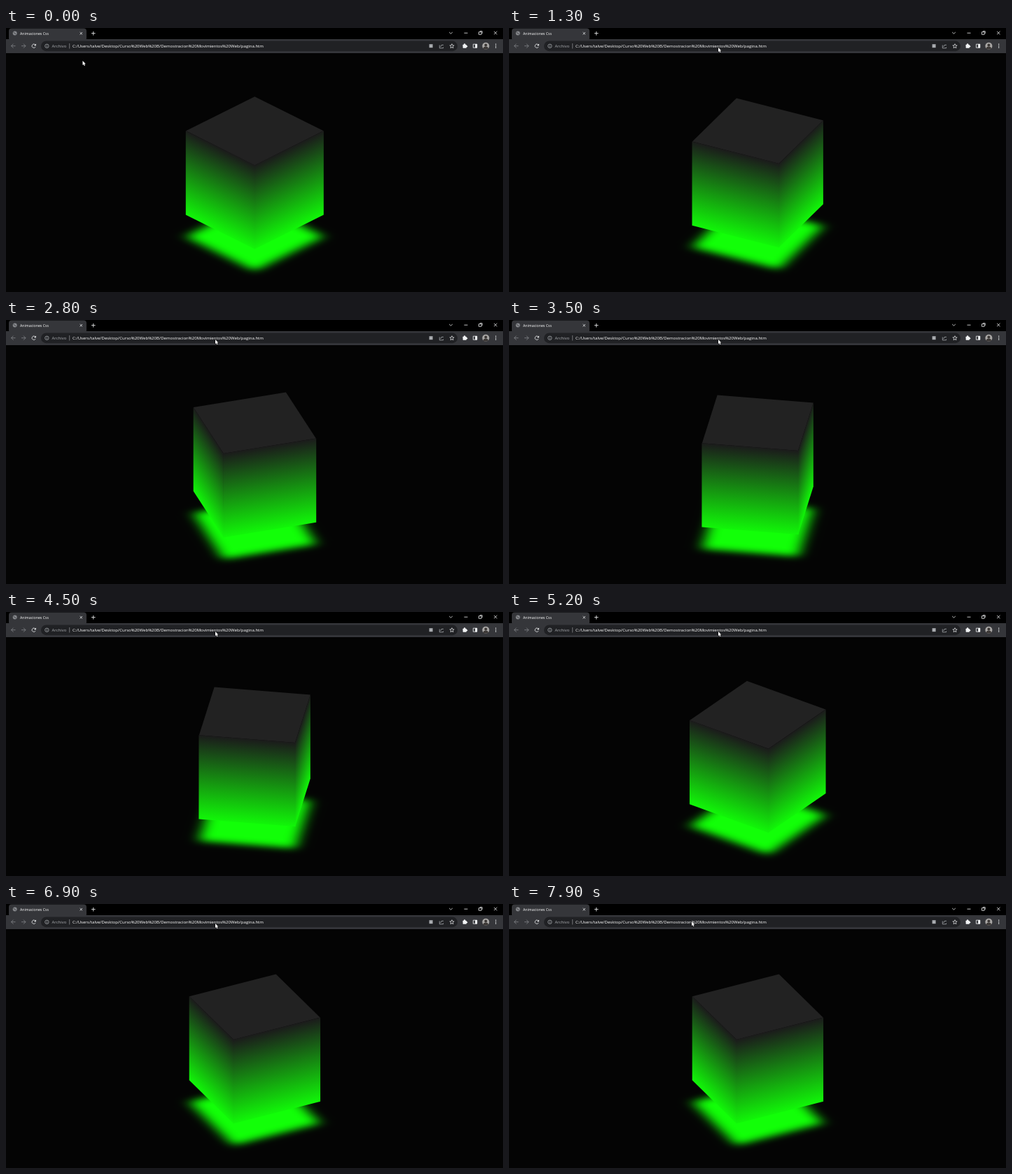
Recreate the animation shown at these times as an HTML page with a canvas. Size 710x378 px, loop 8000 ms.

```html
<!DOCTYPE html>
<html lang="es">
<head>
<meta charset="utf-8">
<title>Animaciones Css</title>
<style>
html, body { margin: 0; width: 100%; height: 100%; overflow: hidden; background: #040404; }
canvas { display: block; }
</style>
</head>
<body>
<canvas id="stage" width="710" height="378"></canvas>
<script>
const ctx = document.getElementById('stage').getContext('2d');
const LOOP = 8000, STEP = 100, DELAY = 100, PERIOD = 4000;
const GREEN = '#12ff08', BAR = '#35363a', DARK = '#202124';
const ICON = '#f1f3f4', SOFT = '#a8abaf', DIM = '#85878b';
const CX = 355.3, TOP_Y = 147.3, RADIUS = 98.2, HEIGHT = 120.3, FLOOR_Y = 298.7;
const SIDE = RADIUS * Math.SQRT2;
const FONT = '"Open Sans", "Noto Sans", sans-serif';

const ease = (t, from, to) => {
  const p = Math.min(1, Math.max(0, (t - from) / (to - from)));
  return p * p * (3 - 2 * p);
};

// Shapes around an origin: place(x, y, draw) moves it.
function place(x, y, paint) {
  ctx.save();
  ctx.translate(x, y);
  paint();
  ctx.restore();
}

function path(points, close) {
  ctx.beginPath();
  points.forEach(([x, y]) => ctx.lineTo(x, y));
  if (close) ctx.closePath();
}

function stroke(color, width = .8) {
  ctx.strokeStyle = color;
  ctx.lineWidth = width;
  ctx.stroke();
}

function fill(color) {
  ctx.fillStyle = color;
  ctx.fill();
}

function line(color, ...points) {
  path(points);
  stroke(color);
}

function box(x, y, w, h, r = 0) {
  ctx.beginPath();
  ctx.roundRect(x, y, w, h, r);
}

function arc(x, y, r, from = 0, to = 2 * Math.PI) {
  ctx.beginPath();
  ctx.arc(x, y, r, from, to);
}

function text(str, x, y, size, color) {
  ctx.font = `${size}px ${FONT}`;
  ctx.fillStyle = color;
  ctx.fillText(str, x, y);
}

function cross(r) {
  line(ICON, [-r, -r], [r, r]);
  line(ICON, [-r, r], [r, -r]);
}

function arrow(dir) {
  line(DIM, [-3 * dir, 0], [3 * dir, 0]);
  line(DIM, [0, -3], [3 * dir, 0], [0, 3]);
}

function star(r) {
  path(Array.from({ length: 10 }, (_, i) => {
    const a = (i / 5 - .5) * Math.PI, d = i % 2 ? r * .45 : r;
    return [d * Math.cos(a), d * Math.sin(a)];
  }), true);
  stroke(ICON, .7);
}

// Blurred square at twice its size on the floor
const GLOW = 440;
const glow = document.createElement('canvas');
glow.width = glow.height = GLOW;
const pen = glow.getContext('2d');
pen.shadowColor = GREEN;
pen.shadowBlur = 36;
pen.shadowOffsetX = 1000;
pen.fillRect(GLOW / 2 - SIDE - 1000, GLOW / 2 - SIDE, 2 * SIDE, 2 * SIDE);

function drawTabs() {
  box(0, 0, 710, 17); fill('#000');
  box(4, .5, 111, 18, 4); fill(BAR);
  box(0, 16, 710, 20); fill(BAR);
  arc(12.7, 7.6, 3); fill(DIM);
  line(BAR, [10.5, 6], [14.5, 9]);
  text('Animaciones Css', 20, 9.6, 5.25, '#fff');
  place(107.3, 7.7, () => cross(1.7));
  place(124.8, 7.7, () => {
    ctx.rotate(Math.PI / 4);
    cross(2);
  });
  line(ICON, [633.2, 6], [635.5, 8.2], [637.8, 6]);
  line(ICON, [654.5, 7.2], [659.5, 7.2]);
  box(675.5, 5.7, 3.6, 3.6); stroke(ICON);
  line(ICON, [676.8, 4.6], [680.2, 4.6], [680.2, 8]);
  place(699.3, 7, () => cross(2.2));
}

function drawToolbar() {
  place(10.5, 25.7, () => arrow(-1));
  place(25, 25.7, () => arrow(1));
  arc(39.8, 25.7, 2.7, .5, 5.4); stroke(ICON);
  path([[42.9, 22.4], [42.9, 25.3], [40, 25.3]], true); fill(ICON);

  box(50, 18.6, 595, 14.6, 7.3); fill(DARK);
  arc(58.4, 25.8, 2.7); stroke(SOFT);
  line(SOFT, [58.4, 25.4], [58.4, 27.4]);
  arc(58.4, 24.3, .45); fill(SOFT);
  text('Archivo', 65.5, 28, 6.05, SOFT);
  line(DIM, [90.7, 22], [90.7, 29.5]);
  text('C:/Users/talve/Desktop/Curso%20Web%20B/Demostracion%20Movimientos%20Web/pagina.htm',
    95, 28, 6.05, '#fff');

  box(604.6, 23.2, 5, 5); fill(SOFT);
  line(SOFT, [619.3, 24.5], [619.3, 28.8], [624.6, 28.8], [624.6, 27.3]);
  line(SOFT, [620.8, 27], [622, 24.5], [625, 24.3]);
  place(637, 26, () => star(3.3));
  box(652.6, 23.7, 5.2, 5, .6); fill(ICON);
  arc(655.1, 23.4, 1.2); fill(ICON);
  arc(658, 26.2, 1.2); fill(ICON);
  box(667.4, 23.2, 5.4, 5); stroke(ICON);
  box(670.2, 23, 2.8, 5.4); fill(ICON);

  place(685.4, 25.7, () => {
    arc(0, 0, 5); fill('#a9a7a5');
    ctx.clip();
    arc(0, -1.3, 2); fill('#3c3836');
    arc(0, 4.5, 3.8); fill('#3c3836');
  });
  for (let i = -1; i <= 1; i++) {
    arc(699.7, 25.7 + 2.4 * i, .75); fill(ICON);
  }
}

// Seen from 30° above, so depth on the floor halves.
function drawCube(turn) {
  const tilt = Math.PI / 4 - turn;
  const c = Math.cos(tilt), s = Math.sin(tilt);
  ctx.save();
  ctx.setTransform(c / 2, s / 4, -s / 2, c / 4, CX, FLOOR_Y);
  ctx.drawImage(glow, -GLOW / 2, -GLOW / 2);
  ctx.restore();

  const corners = [0, 1, 2, 3].map(i => {
    const a = i * Math.PI / 2 - turn;
    return [CX + RADIUS * Math.cos(a), TOP_Y + RADIUS / 2 * Math.sin(a)];
  });
  const shade = ctx.createLinearGradient(0, 0, 0, 1);
  shade.addColorStop(0, '#1b1b1b');
  shade.addColorStop(1, '#11f608');
  corners.forEach(([x, y], i) => {
    const [x2, y2] = corners[(i + 1) % 4];
    if (x2 >= x) return; // faces away
    ctx.save();
    ctx.setTransform(x2 - x, y2 - y, 0, HEIGHT, x, y);
    ctx.fillStyle = shade;
    ctx.fillRect(-.003, 0, 1.006, 1); // overlap hides the seam
    ctx.restore();
  });
  path(corners, true);
  fill('#222');
}

function drawPointer(t) {
  const enter = ease(t, 0, 1000), leave = ease(t, 7200, 7900);
  place(109.5 + 189.5 * enter - 38 * leave, 47 - 19 * enter - 3 * leave, () => {
    path([[0, 0], [0, 6.2], [1.4, 5], [2.4, 7.2], [3.4, 6.7], [2.5, 4.6], [4.4, 4.5]], true);
    stroke('#000');
    fill('#fff');
  });
}

function draw(now) {
  const t = Math.floor(now % LOOP / STEP) * STEP;
  ctx.fillStyle = '#040404';
  ctx.fillRect(0, 0, 710, 378);
  drawCube(Math.max(0, t - DELAY) / PERIOD * 2 * Math.PI);
  drawTabs();
  drawToolbar();
  drawPointer(t);
}

const start = performance.now();
function frame() {
  draw(performance.now() - start);
  requestAnimationFrame(frame);
}
frame();
</script>
</body>
</html>
```
